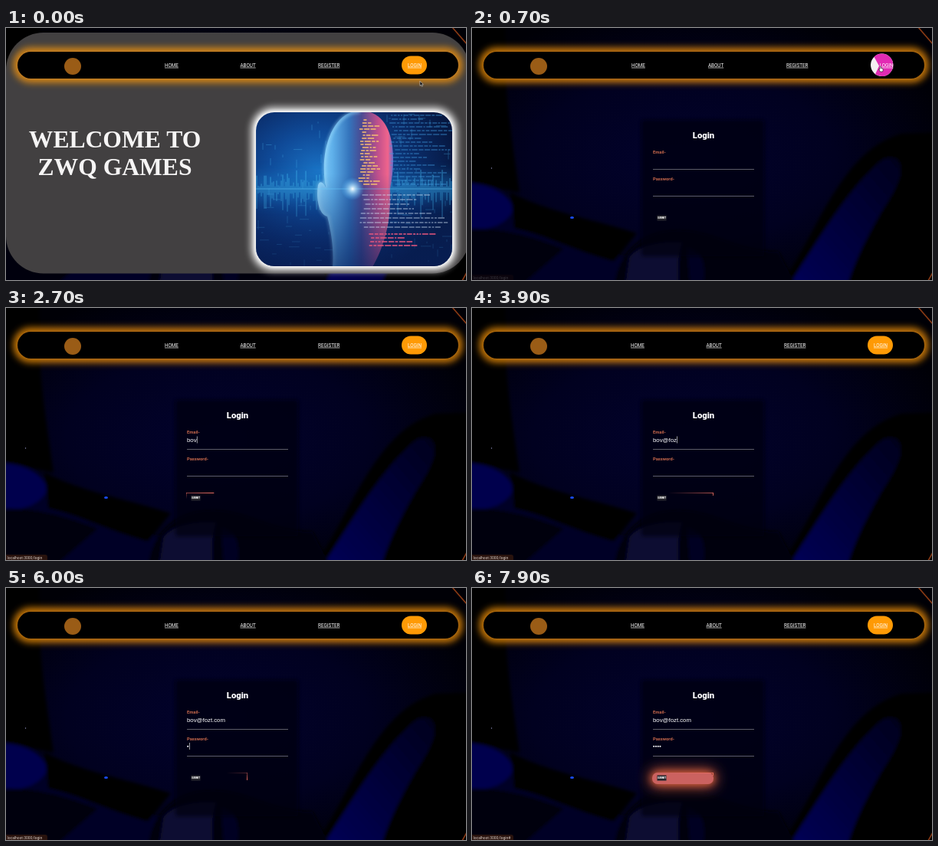
Recreate the animation shown at these times as an HTML page. Size 600x329 px, loop 8000 ms.

```html
<!DOCTYPE html>
<html lang="en">
<head>
<meta charset="utf-8">
<title>Login demo</title>
<style>
html, body { margin: 0; height: 100%; overflow: hidden; background: #000; }
svg { display: block; width: 100vw; height: 100vh; }
text { font-family: Roboto, sans-serif; fill: #fff; }
.menu text { font-size: 6.3px; text-decoration: underline; }
.title text { font: bold 31.6px "Liberation Serif", serif; text-anchor: middle; fill: #f6f5f5; }
.label text { font-size: 5.8px; font-weight: 700; fill: #cb6a4d; }
.typed { font: 7.8px "Liberation Sans", sans-serif; }
</style>
</head>
<body>
<svg viewBox="0 0 600 329" preserveAspectRatio="none">
  <defs>
    <filter id="b2" x="-50%" y="-50%" width="200%" height="200%"><feGaussianBlur stdDeviation="2"/></filter>
    <filter id="b4" x="-20%" y="-100%" width="140%" height="300%"><feGaussianBlur stdDeviation="4.5"/></filter>
    <filter id="b9" x="-60%" y="-150%" width="220%" height="400%"><feGaussianBlur stdDeviation="9"/></filter>
    <radialGradient id="night" cx=".46" cy=".52" r=".6">
      <stop stop-color="#02022c"/><stop offset=".55" stop-color="#010120"/><stop offset="1" stop-color="#000006"/>
    </radialGradient>
    <linearGradient id="grip" x1="0" x2="1" y1="1" y2="0">
      <stop stop-color="#000058"/><stop offset="1" stop-color="#00001c"/>
    </linearGradient>
    <radialGradient id="sky" cx=".32" cy=".38" r=".72">
      <stop stop-color="#1a72c4"/><stop offset=".35" stop-color="#0f4a98"/>
      <stop offset=".7" stop-color="#0a2a66"/><stop offset="1" stop-color="#06173f"/>
    </radialGradient>
    <linearGradient id="skin">
      <stop stop-color="#8fd6ff"/><stop offset=".2" stop-color="#5fb0ea"/><stop offset=".42" stop-color="#3474bc"/>
      <stop offset=".58" stop-color="#4a4a92"/><stop offset=".8" stop-color="#c0508c"/>
      <stop offset=".93" stop-color="#f0648c"/><stop offset="1" stop-color="#6a68c8"/>
    </linearGradient>
    <linearGradient id="fadeDown" x1="0" x2="0" y1="0" y2="1">
      <stop offset=".4" stop-color="#0a2c70" stop-opacity="0"/><stop offset="1" stop-color="#08205a" stop-opacity=".65"/>
    </linearGradient>
    <radialGradient id="spark"><stop stop-color="#fff"/><stop offset=".25" stop-color="#bfeaff" stop-opacity=".8"/><stop offset="1" stop-color="#48b4ff" stop-opacity="0"/></radialGradient>
    <linearGradient id="g0"><stop stop-color="#f07060" stop-opacity="0"/><stop offset="1" stop-color="#f07060"/></linearGradient>
    <linearGradient id="g1" x1="0" x2="0" y1="0" y2="1"><stop stop-color="#f07060" stop-opacity="0"/><stop offset="1" stop-color="#f07060"/></linearGradient>
    <linearGradient id="g2" x1="1" x2="0"><stop stop-color="#f07060" stop-opacity="0"/><stop offset="1" stop-color="#f07060"/></linearGradient>
    <linearGradient id="g3" x1="0" x2="0" y1="1" y2="0"><stop stop-color="#f07060" stop-opacity="0"/><stop offset="1" stop-color="#f07060"/></linearGradient>
    <clipPath id="frame"><rect x="326" y="110" width="256" height="201" rx="24"/></clipPath>
    <clipPath id="btn"><rect x="235" y="241" width="80" height="15"/></clipPath>
  </defs>

  <!-- dark backdrop -->
  <rect width="600" height="329" fill="url(#night)"/>
  <g filter="url(#b2)">
    <path d="M-9 -9H45C38 60 50 130 62 215L-9 200Z" fill="#000005"/>
    <path d="M-9 202C20 203 48 214 58 240L100 270L200 300L190 340H-9Z" fill="#000028"/>
    <path d="M-9 203C25 203 50 216 54 238C40 262 15 264 -9 262Z" fill="#00004e"/>
    <path d="M50 214C90 238 160 250 215 268L185 305C130 290 90 268 55 262Z" fill="#000006"/>
    <path d="M-9 262C30 260 70 268 120 288L60 340H-9Z" fill="#000009"/>
    <path d="M400 340C450 270 480 160 560 138L610 136V340Z" fill="#000005"/>
    <path d="M418 329C450 280 490 210 535 172C565 160 566 190 545 222C520 262 500 300 488 340H412Z" fill="url(#grip)"/>
    <path d="M185 340C190 290 225 264 268 264C318 264 335 290 400 292L425 340Z" fill="#000007"/>
    <path d="M205 300C215 284 245 278 274 280C270 294 268 306 270 335H200Z" fill="#080832"/>
    <path d="M280 286C300 290 306 305 302 335H284Z" fill="#000020"/>
  </g>
  <ellipse cx="130.500" cy="247.500" rx="2.500" ry="1.600" fill="#1a4cff"/>
  <circle cx="25.500" cy="183" r=".7" fill="#9090c0"/>
  <path d="M582 -1L601 21M595 330L601 319" stroke="#8a3a14" stroke-width="1.600"/>

  <g id="home">
    <rect y="6" width="605" height="314.500" rx="49" fill="#424041"/>
    <g class="title"><text x="142" y="155.500">WELCOME TO</text><text x="142" y="192">ZWQ GAMES</text></g>
    <g id="picture">
      <rect x="319" y="103" width="270" height="215" rx="30" fill="#fff" opacity=".75" filter="url(#b4)"/>
      <rect x="324" y="108" width="260" height="205" rx="26" fill="#fff" filter="url(#b2)"/>
      <g clip-path="url(#frame)">
        <rect x="326" y="110" width="256" height="201" fill="url(#sky)"/>
        <rect x="320" y="192" width="270" height="34" fill="#1e8ad8" opacity=".4" filter="url(#b9)"/>
        <path id="bars" stroke="#48c0f4" stroke-width="1" opacity=".6"/>
        <path id="net" stroke="#4cb8f0" stroke-width=".8" opacity=".4"/>
        <path d="M426 312C428 285 423 262 419 246C408 244 404 222 407 205C410 198 414 202 417 208C408 160 426 108 462 108C504 108 511 160 501 210C503 250 494 284 478 312Z" fill="url(#skin)"/>
        <path d="M427 312C429 285 424 262 420 246C408 243 405 222 408 205C411 199 414 202 417 208C409 160 427 109 462 109" fill="none" stroke="#a8e4ff" stroke-width="3" opacity=".7" filter="url(#b2)"/>
        <rect x="326" y="110" width="256" height="201" fill="url(#fadeDown)"/>
        <path id="amber" stroke="#f6bd72" stroke-width="1.600"/>
        <path id="teal" stroke="#3e9ade" stroke-width="1" opacity=".75"/>
        <path id="pale" stroke="#d4e6fa" stroke-width="1" opacity=".75"/>
        <path id="rose" stroke="#e8567e" stroke-width="1.500"/>
        <path d="M326 210H582" stroke="#68cfff" stroke-width="1" opacity=".5"/>
        <circle cx="452" cy="210" r="15" fill="url(#spark)"/>
      </g>
    </g>
  </g>

  <g id="login">
    <rect x="221" y="120" width="160" height="178" rx="3" fill="#00000c" opacity=".68" filter="url(#b2)"/>
    <text x="302" y="144.300" font-size="11.300" font-weight="900" text-anchor="middle">Login</text>
    <g class="label"><text x="236" y="164">Email-</text><text x="236" y="198.500">Password-</text></g>
    <path d="M236 184.500H368M236 219.500H368" stroke="#77777e" stroke-width=".8"/>
    <text id="email" class="typed" x="236" y="174.600"></text>
    <g id="dots" fill="#fff"></g>
    <rect id="caret" width=".7" height="9" fill="#ddd"/>
    <g id="glow">
      <rect x="232" y="238" width="86" height="21" rx="9" fill="#d8603c" filter="url(#b9)"/>
      <rect x="234" y="240" width="82" height="17" rx="8" fill="#e0623c" opacity=".7" filter="url(#b4)"/>
      <rect x="235" y="241" width="80" height="15" rx="7" fill="#cb6260"/>
    </g>
    <g id="edges" clip-path="url(#btn)"></g>
    <rect x="241.500" y="244.500" width="12" height="7" fill="#25252c"/>
    <text x="247.500" y="249.300" font-size="3" font-weight="900" text-anchor="middle">SUBMIT</text>
    <g id="status">
      <path d="M0 322H51Q54 322 54 325V329H0Z" fill="#29130e"/>
      <text id="url" x="1.500" y="327.700" font-size="5" style="fill:#dccfc8"></text>
    </g>
  </g>

  <!-- navigation bar -->
  <rect x="8" y="24" width="589" height="49" rx="24" fill="#ff9a08" opacity=".45" filter="url(#b4)"/>
  <rect x="13" y="29" width="579" height="39" rx="19.500" fill="#ff9a08" opacity=".7" filter="url(#b4)"/>
  <rect x="15" y="31" width="575" height="35" rx="17.500"/>
  <circle cx="87" cy="50" r="11" fill="#9a5c16"/>
  <rect id="pill" x="516" y="36.500" width="33" height="24" rx="12" fill="#ff9a05"/>
  <g id="pie">
    <circle cx="534.700" cy="48.300" r="14.700" fill="#f4eef2"/>
    <path d="M531 49.500L524.500 37.700A14.700 14.700 0 1 1 526 60.200Z" fill="#e22bb4"/>
  </g>
  <g class="menu"><text y="50.700">HOME</text><text y="50.700">ABOUT</text><text y="50.700">REGISTER</text><text y="50.700">LOGIN</text></g>

  <path id="arrow" d="M0 0V6L1.400 4.800L2.400 7L3.500 6.500L2.500 4.400H4.300Z" fill="#000" stroke="#ddd" stroke-width=".6"/>
  <path id="hand" d="M0 .5Q.8 -.5 1.500 .5V2.500L4 3.200Q4.800 5 3.500 7H.5L-1.500 4L0 4Z" fill="#fff" stroke="#111" stroke-width=".6"/>
</svg>
<script>
const $ = id => document.getElementById(id);
const set = (el, attrs) => { for (const k in attrs) el.setAttribute(k, attrs[k]); };
const show = (id, on) => $(id).setAttribute("opacity", +on);
const move = (id, x, y) => set($(id), { transform: `translate(${x} ${y})` });
const ramp = (t, a, b) => Math.min(1, Math.max(0, (t - a) / (b - a)));
const add = (parent, tag, attrs) => {
  const el = document.createElementNS("http://www.w3.org/2000/svg", tag);
  set(el, attrs);
  return $(parent).appendChild(el);
};

let seed = 7;
const rnd = () => (seed = seed * 16807 % 2147483647) / 2147483647;

// rows of short dashes that read as distant code
function codeRows(id, left, right, top, bottom, step) {
  let d = "";
  for (let y = top; y < bottom; y += step) {
    const end = left + (right - left) * (.4 + .6 * rnd());
    for (let x = left + rnd() * 8; x < end;) {
      const w = 2 + rnd() * 7;
      d += `M${x.toFixed(1)} ${y}h${w.toFixed(1)}`;
      x += w + 1.5;
    }
  }
  set($(id), { d });
}
codeRows("amber", 459, 486, 120, 206, 4);
codeRows("teal", 500, 582, 114, 206, 5);
codeRows("pale", 461, 580, 218, 262, 6);
codeRows("rose", 470, 582, 269, 286, 5);

let bars = "", net = "";
for (let x = 327; x < 582; x += 2) {
  const h = 5 + 40 * rnd() ** 2.5;
  bars += `M${x} ${210 - h * .6}v${h * 1.5}`;
  net += `M${x} ${112 + rnd() * 195}${rnd() < .5 ? "v" : "h"}${2 + rnd() * 12}`;
}
set($("bars"), { d: bars });
set($("net"), { d: net });

const address = "bov@fozt.com";
const dots = [0, 1, 2, 3].map(i => add("dots", "circle", { cx: 237.2 + i * 2.75, cy: 206.8, r: 1.05 }));
const edges = [0, 1, 2, 3].map(i => add("edges", "rect", {
  fill: `url(#g${i})`, width: i % 2 ? 1 : 80, height: i % 2 ? 15 : 1,
  x: i === 1 ? 314 : 235, y: i === 2 ? 255 : 241
}));
const links = document.querySelectorAll(".menu text");
const restX = [207, 305.5, 407, 524], hoverX = [208, 308, 410, 531.5];

function drawEdges(t) {
  const phase = t / 1000 + .4125;
  edges.forEach((el, i) => {
    const p = (phase - i / 4 + 1) % 1;
    const offset = (4 * p - 1) * (i < 2 ? 1 : -1);
    set(el, i % 2 ? { y: 241 + 15 * offset } : { x: 235 + 80 * offset });
    set(el, { opacity: +(t >= 750 && p < .5) });
  });
}

function drawForm(t) {
  const chars = t < 2100 ? 0 : Math.min(12, 1 + Math.floor((t - 2100) / 300));
  const hidden = t < 6000 ? 0 : Math.min(4, 1 + Math.floor((t - 6000) / 250));
  const email = $("email");
  email.textContent = address.slice(0, chars);
  dots.forEach((el, i) => set(el, { opacity: +(i < hidden) }));
  const inPassword = t >= 5700;
  const width = chars ? email.getComputedTextLength() : 0;
  set($("caret"), {
    x: 236.3 + (inPassword ? hidden * 2.75 : width),
    y: inPassword ? 202 : 167.5,
    opacity: +(t >= 1300 && t < 7300)
  });
  show("glow", ramp(t, 7200, 7700));
  show("status", ramp(t, 600, 1000));
  $("url").textContent = "localhost:3000/login" + (t >= 7500 ? "#" : "");
  drawEdges(t);
}

function draw(t) {
  const hover = t >= 200 && t < 1000;
  show("home", t < 600);
  show("login", t >= 600);
  move("picture", 5.5 * ramp(t, 0, 200), 0);
  show("pill", !hover);
  show("pie", hover);
  links.forEach((el, i) => set(el, { x: (hover ? hoverX : restX)[i] }));

  const reach = ramp(t, 0, 200), leave = ramp(t, 900, 1250);
  show("hand", hover);
  show("arrow", !hover && t < 1300);
  move("arrow", 540 - 8 * reach - 257 * leave, 69.5 - 19 * reach + 121 * leave);
  move("hand", 532 - 257 * leave, 50 + 121 * leave);
  drawForm(t);
}

const start = performance.now();
function tick() {
  draw((performance.now() - start) % 8000);
  requestAnimationFrame(tick);
}
tick();
</script>
</body>
</html>
```
